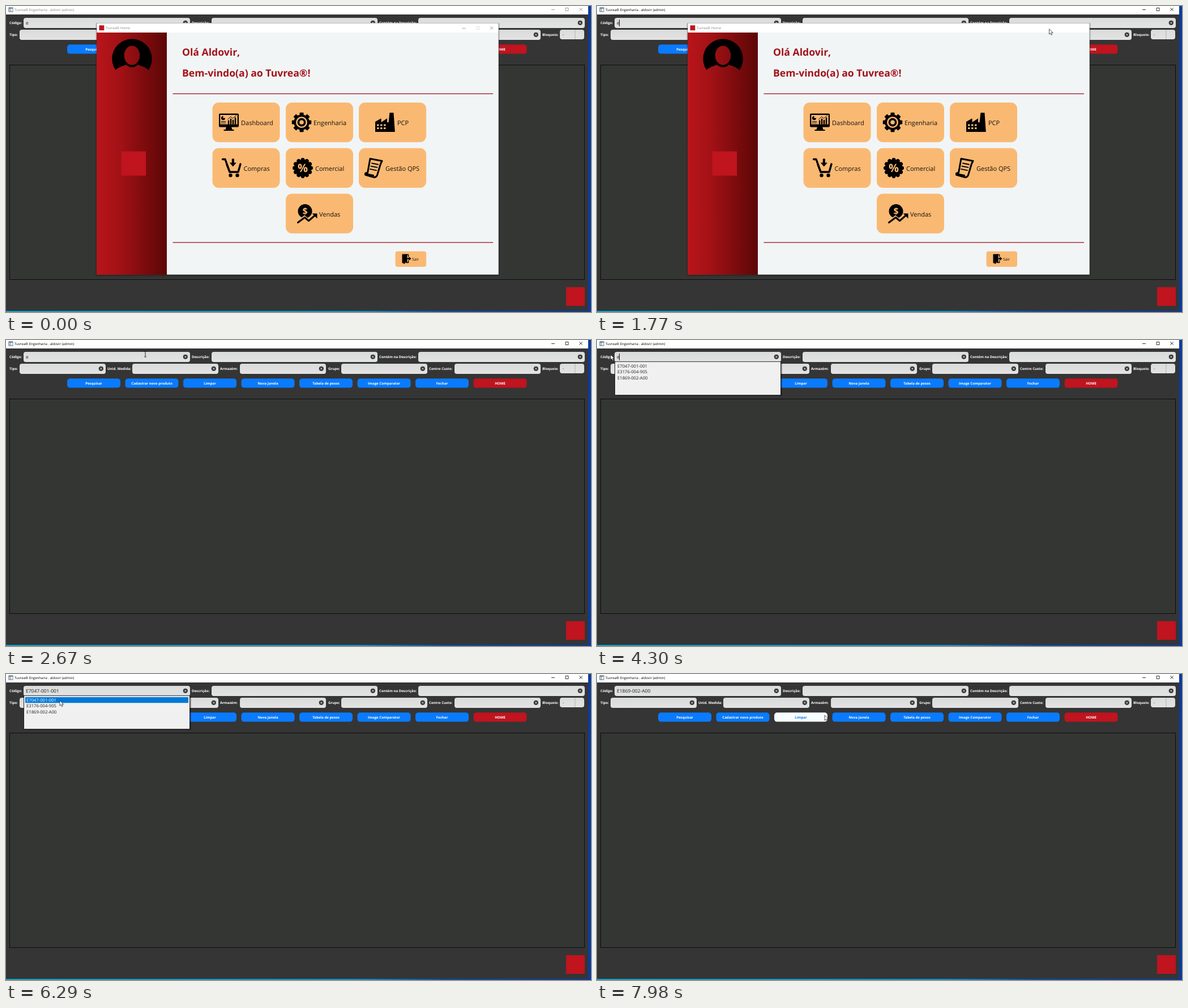
Animation of 1033 by 542 pixels, one loop 8000 ms. Source, as an HTML page:

```html
<!DOCTYPE html>
<html lang="pt">
<head>
<meta charset="utf-8">
<style>
html, body { margin: 0; width: 100%; height: 100%; overflow: hidden; background: #353535; }
svg { display: block; width: 1033px; height: 542px; font-family: "Open Sans", "Noto Sans", sans-serif; text-rendering: geometricPrecision; }
.b { font-weight: 700; }
.ink { fill: #000; }
.pen { fill: none; stroke: #000; stroke-linecap: round; stroke-linejoin: round; }
.bg { fill: var(--c); }
.cut { fill: none; stroke: var(--c); }
</style>
</head>
<body>
<svg id="stage" viewBox="0 0 1033 542"></svg>
<script>
const LOOP = 8000, RED = '#c0141f', BLUE = '#0a7bff', TILE = '#fab972';
const stage = document.getElementById('stage');
const $ = id => document.getElementById(id);

const rect = (x, y, w, h, fill, more = '') =>
  `<rect x="${x}" y="${y}" width="${w}" height="${h}" fill="${fill}" ${more}/>`;
const text = (x, y, size, fill, str, more = '') =>
  `<text x="${x}" y="${y}" font-size="${size}" fill="${fill}" ${more}>${str}</text>`;
const path = (d, cls = 'ink', more = '') => `<path d="${d}" class="${cls}" ${more}/>`;
const disc = (x, y, r, cls = 'ink', more = '') => `<circle cx="${x}" cy="${y}" r="${r}" class="${cls}" ${more}/>`;
const ring = (n, draw) => Array.from({ length: n }, (_, i) => draw(i * 360 / n)).join('');

// Main window
const fields = [
  [31, 325, 21], [363, 656, 21], [728, 1022, 21],
  [24, 176, 42], [223, 375, 42], [413, 565, 42], [592, 744, 42], [792, 944, 42]
];
const labels = [
  [6, 32, 'Código:'], [328, 32, 'Descrição:'], [659, 32, 'Contém na Descrição:'],
  [6, 53, 'Tipo:'], [179, 53, 'Unid. Medida:'], [378, 53, 'Armazém:'],
  [569, 53, 'Grupo:'], [747, 53, 'Centro Custo:'], [947, 53, 'Bloqueio:']
];
const buttons = ['Pesquisar', 'Cadastrar novo produto', 'Limpar', 'Nova Janela',
  'Tabela de pesos', 'Image Comparator', 'Fechar', 'HOME'].map((name, i) => ({ name, x: 108 + 102.5 * i }));

const field = ([x1, x2, y]) => {
  const cx = x2 - 8.2, cy = y + 8.8;
  return rect(x1, y, x2 - x1, 18, 'url(#field)', 'rx="4"') + disc(cx, cy, 4.1, '', 'fill="#353535"') +
    path(`M${cx - 1.5} ${cy - 1.5}l3 3m0-3l-3 3`, '', 'stroke="#e6e6e6" stroke-width="1"');
};

const windowButtons = (x, y, midOpacity) =>
  path(`M${x - 3} ${y + .5}h6`, 'wb') +
  path(`M${x + 22} ${y - 2.5}h5v5h-5z`, 'wb', `opacity="${midOpacity}"`) +
  path(`M${x + 46.4} ${y - 2.7}l5.4 5.4m0-5.4l-5.4 5.4`, 'wb');

const mainWindow = () =>
  rect(0, 0, 1033, 542, '#353535') +
  rect(0, 0, 1028, 15, '#fff') +
  rect(1028, 0, 5, 542, '#0b3b9c') +
  rect(0, 540, 1033, 2, 'url(#taskbar)') +
  rect(4.5, 2.5, 8, 8, '#5b6b7a') + rect(5.5, 4.5, 3, 5, '#bcdcf2') + rect(9, 4.5, 2.6, 5, '#fff') +
  `<g id="title">${text(15, 9.2, 6.1, 'currentColor', 'Tuvrea® Engenharia . aldovir (admin)')}
   <g fill="none" stroke="currentColor" stroke-width=".8">${windowButtons(966, 6, 1)}</g></g>` +
  labels.map(([x, y, s]) => text(x, y, 6.1, '#fff', s, 'class="b"')).join('') +
  fields.map(field).join('') +
  rect(978, 42, 43, 17, 'url(#field)', 'rx="4"') + rect(1004.5, 42, .8, 17, '#a8a8a8') +
  text(983, 53, 7, '#222', '-') +
  buttons.map((b, i) =>
    rect(b.x, 68.3, 94, 16.3, '', `rx="5" id="btn${i}"`) +
    text(b.x + 47, 79, 6.1, '#fff', b.name, `class="b" text-anchor="middle" id="cap${i}"`)).join('') +
  rect(6.5, 104.5, 1015, 380, '#343634', 'stroke="#0c0c0c"') +
  rect(989, 498, 33, 33, RED) +
  rect(35, 24.5, 5, 11.5, '#0078d7', 'id="selection"') +
  text(35, 33.2, 8.5, '#222', '', 'id="code"') +
  rect(39, 24, 1, 12, '#111', 'id="caret"');

// Completion list
const codes = ['E7047-001-001', 'E3176-004-905', 'E1869-002-A00'];
const rowTop = i => 41 + 10.3 * i;
const popup = () =>
  `<g id="popup">` + rect(33.5, 40, 293.5, 59, '#000', 'opacity=".35"') +
  rect(31.5, 38.3, 293, 59.4, '#f0f0f0', 'stroke="#161616" stroke-width=".9"') +
  codes.map((c, i) =>
    rect(34, rowTop(i), 288, 10.2, '#0078d7', `id="row${i}"`) +
    text(36, rowTop(i) + 8, 7.66, '#222', c, `id="item${i}"`)).join('') + `</g>`;

// Home window icons
const icons = {
  dashboard: rect(376, 190.5, 35, 24, '#000', 'rx="2"') + rect(378.3, 193, 30.4, 16.5, '', 'class="bg"') +
    path('M389 214h9l1.5 5h3v2h-18v-2h3z') + disc(383.5, 198.5, 3.6) +
    path('M383.5 198.5v-4a4 4 0 0 1 4 4z', 'bg') +
    path('M380 204.5h8m-8 2.5h8', 'pen', 'stroke-width="1"') +
    path('M393 208.5v-5m4 5v-8m4 8v-6m4 6v-10', 'pen', 'stroke-width="2.5" stroke-linecap="butt"') +
    path('M391.5 201l5-5 4 3 6-5', 'pen', 'stroke-width="1"'),
  gear: disc(522, 206, 13.8) +
    ring(8, a => rect(518.5, 188.8, 7, 8, '#000', `rx="1" transform="rotate(${a} 522 206)"`)) +
    disc(522, 206, 8.7, 'cut', 'stroke-width="2.6"') + disc(522, 206, 3.8, 'bg'),
  factory: path('M652 223v-18l10.5-6v7l10.5-7v7h2.6l1.8-17h7l2.4 34z') +
    [0, 1].map(r => [0, 1, 2].map(c => rect(655 + c * 6, 209.5 + r * 5.5, 3.5, 3, '', 'class="bg"')).join('')).join(''),
  cart: path('M382.5 271.5h4.5l8 22.5h15l4-14', 'pen', 'stroke-width="3.4"') +
    path('M390 281l5 13', 'pen', 'stroke-width="3.4"') +
    disc(396.5, 300, 3.2) + disc(408.5, 300, 3.2) +
    path('M398.8 270.5h4v7h4l-6 7-6-7h4z'),
  percent: disc(524, 287, 15.2) +
    ring(12, a => disc(524, 272.4, 3.4, 'ink', `transform="rotate(${a} 524 287)"`)) +
    text(524, 294.2, 20, 'var(--c)', '%', 'class="b" text-anchor="middle"'),
  scroll: path('M643 270.5l21 4-2.5 5-6 20q-2 5-7 3.5l-14-4q-1-4 4-3.5z', 'pen', 'stroke-width="3"') +
    path('M633 295.5l17 3.5q0 4-3 4-14-2-14-7.5z') +
    path('M646 278.5l11 2.2m-12.5 3l11 2.2m-12.5 3l11 2.2', 'pen', 'stroke-width="1.9"'),
  sales: disc(528, 363.5, 12.5) +
    text(528, 369.3, 16, 'var(--c)', '$', 'class="b" text-anchor="middle"') +
    path('M515 384l12-9.5 7 6 12-10.5', 'cut', 'stroke-width="6"') +
    path('M515.5 383.5l12-9 7 6 12-10.5', 'pen', 'stroke-width="3"') +
    path('M540.5 367.5h9v9z'),
  exit: path('M699.5 439.5h9l0 1.5v13.5h-4v2.5l-5-2z') +
    path('M707 440.5h3.6v3.5m0 7v3.5h-3.6', 'pen', 'stroke-width="1.3"') +
    path('M708.5 446.3h3v-2.4l4 3.6-4 3.6v-2.4h-3z')
};
const tiles = [
  [364.5, 171, 'Dashboard', 415, 'dashboard'], [494, 171, 'Engenharia', 543, 'gear'], [623, 171, 'PCP', 691, 'factory'],
  [364.5, 251.7, 'Compras', 419.5, 'cart'], [494, 251.7, 'Comercial', 546, 'percent'], [623, 251.7, 'Gestão QPS', 670, 'scroll'],
  [494, 332.5, 'Vendas', 553, 'sales']
];

const homeWindow = () => `<g id="home">` +
  rect(158.5, 30, 713, 448.5, '#000', 'opacity=".22" rx="2"') +
  rect(160, 30, 710, 446, '#f1f5f6') + rect(160, 30, 710, 17, '#fff') +
  rect(160.2, 30.2, 709.6, 445.6, 'none', 'stroke="#777" stroke-width=".5"') +
  rect(164.5, 34.3, 8.8, 8.8, RED) + text(176, 41.4, 6.1, '#8a8a8a', 'Tuvrea® Home') +
  rect(796.5, 30.5, 24.3, 16, '#e5e5e5', 'id="minHover"') +
  `<g id="homeButtons" fill="none" stroke="#8c8c8c" stroke-width=".8">${windowButtons(808.5, 39, .3)}</g>` +
  rect(160, 47, 124, 429, 'url(#side)') +
  rect(186, 57, 74, 60, '#000', 'mask="url(#avatar)"') +
  rect(203.5, 257.5, 43.5, 43, RED) +
  text(311, 87.6, 17.6, '#a3121a', 'Olá Aldovir,', 'class="b"') +
  text(311, 125.2, 17.6, '#a3121a', 'Bem-vindo(a) ao Tuvrea®!', 'class="b"') +
  rect(294.5, 154.8, 565.5, 1.3, '#a3121f') + rect(294.5, 418.2, 565.5, 1.3, '#a3121f') +
  tiles.map(([x, y, name, tx, icon], i) => `<g id="tile${i}">` +
    rect(x, y, 119, 70.2, '', 'rx="11" class="bg"') + icons[icon] +
    text(tx, y + 40, 11, '#111', name) + `</g>`).join('') +
  `<g style="--c:${TILE}">` + rect(687.5, 434.5, 54.5, 27.5, TILE, 'rx="4"') + icons.exit +
  text(717, 450.8, 6.9, '#111', 'Sair') + `</g></g>`;

const cursors =
  path('M0 0v9.2l2.1-2 1.5 3.4 1.6-.7-1.5-3.3h3z', '', 'id="arrow" fill="#fff" stroke="#111" stroke-width=".7"') +
  path('M-2-5h1.3l.7.6.7-.6h1.3M0-4.4v8.8M-2 5h1.3l.7-.6.7.6h1.3', '', 'id="beam" fill="none" stroke="#111" stroke-width=".9"');

stage.innerHTML = `<defs>
  <linearGradient id="field" x2="0" y2="1"><stop stop-color="#dadbdb"/><stop offset="1" stop-color="#e3e3e3"/></linearGradient>
  <linearGradient id="side"><stop stop-color="#b8151a"/><stop offset=".3" stop-color="#a51216"/><stop offset="1" stop-color="#5c0606"/></linearGradient>
  <linearGradient id="taskbar"><stop stop-color="#12a0c4"/><stop offset=".6" stop-color="#1190cc"/><stop offset=".75" stop-color="#0a50a8"/><stop offset="1" stop-color="#0b3b9c"/></linearGradient>
  <mask id="avatar">${disc(222.5, 93.5, 35.3, '', 'fill="#fff"')}
    <ellipse cx="222.5" cy="87.5" rx="13.8" ry="17"/>
    <path d="M191 117.5C195 109 203 107.5 212 104Q222.5 113 233 104C242 107.5 250 109 254 117.5z"/></mask>
  </defs>` + mainWindow() + popup() + homeWindow() + cursors;

// Motion
const pointer = [
  [390, 585, 506], [530, 562, 420], [600, 556, 370], [740, 574, 300], [880, 645, 235], [1010, 745, 150],
  [1150, 808, 82], [1290, 809, 58], [1490, 804, 41], [1760, 804, 40], [1840, 760, 46], [1908, 682, 53],
  [2045, 527, 102], [2185, 527, 102], [2460, 415, 68], [2667, 246, 25], [2800, 195, 19], [3010, 171, 27],
  [3300, 60, 30], [3440, 34, 28], [3740, 24, 26], [4595, 24, 26], [4940, 72, 54], [5150, 72, 55],
  [5460, 80, 67], [5700, 88, 57], [5930, 93, 46], [6250, 95, 47], [6320, 95, 48], [6500, 94, 57],
  [6690, 94, 66], [7350, 94, 66], [7565, 320, 118], [7705, 572, 189], [7842, 490, 130], [7980, 402, 73]
];
const shrink = [[1700, 1, 1], [1770, 1, 1], [1838, .87, .72], [1908, .64, .24], [1978, .55, .04], [2045, .52, 0]];
const caretOn = [[1700, 2250], [2780, 3300], [3440, 3970], [4300, 4830], [6500, 7030], [7430, 7960]];

function track(keys, t) {
  const i = keys.findIndex(k => k[0] > t);
  if (i === 0) return keys[0].slice(1);
  if (i < 0) return keys[keys.length - 1].slice(1);
  const a = keys[i - 1], b = keys[i], u = (t - a[0]) / (b[0] - a[0]);
  return a.slice(1).map((v, j) => v + (b[j + 1] - v) * u);
}
const show = (id, on) => $(id).setAttribute('display', on ? 'inline' : 'none');
const fill = (id, color) => $(id).setAttribute('fill', color);
const inside = (x, y, x1, y1, w, h) => x >= x1 && x <= x1 + w && y >= y1 && y <= y1 + h;

function render(t) {
  const tick = 390 + 69 * Math.floor((t - 380) / 69);
  const [x, y] = track(pointer, tick);
  const homeOpen = t < 1700, popupOpen = t >= 4300 && t < 7430;

  $('title').style.color = homeOpen ? '#858585' : '#000';
  show('homeButtons', homeOpen);
  show('minHover', homeOpen && inside(x, y, 796, 30, 25, 17));
  const [scale, opacity] = track(shrink, tick);
  const slide = (1 - scale) / .36;
  $('home').setAttribute('transform',
    `translate(${160 + 210 * slide} ${30 + 225 * slide}) scale(${scale}) translate(-160 -30)`);
  $('home').setAttribute('opacity', opacity);
  show('home', opacity > 0);
  tiles.forEach(([tx, ty], i) => {
    const hot = homeOpen && t >= 390 && inside(x, y, tx, ty, 119, 70);
    $('tile' + i).style.setProperty('--c', hot ? '#fcd5a5' : TILE);
  });

  buttons.forEach((b, i) => {
    const hot = !homeOpen && !popupOpen && inside(x, y, b.x, 68, 94, 17);
    const base = b.name === 'HOME' ? RED : BLUE;
    fill('btn' + i, hot ? '#f7feff' : base);
    fill('cap' + i, hot ? base : '#fff');
  });

  const row = t < 5180 ? -1 : Math.max(0, Math.min(2, Math.floor((y - 41) / 10.3)));
  codes.forEach((_, i) => {
    show('row' + i, i === row);
    fill('item' + i, i === row ? '#fff' : '#222');
  });
  show('popup', popupOpen);

  const value = t >= 7430 ? codes[2] : row >= 0 ? codes[row] : t >= 3440 && t < 4300 ? '' : 'e';
  const selected = t >= 3300 && t < 3440;
  $('code').textContent = value;
  fill('code', selected ? '#fff' : '#222');
  show('selection', selected);
  show('caret', caretOn.some(([a, b]) => t >= a && t < b));
  $('caret').setAttribute('x', value.length > 1 ? 94 : value ? 39 : 35);

  const overField = !homeOpen && !popupOpen && t >= 1840 &&
    fields.some(([x1, x2, fy]) => inside(x, y, x1, fy, x2 - x1, 18));
  show('arrow', t >= 390 && !overField);
  show('beam', overField);
  for (const id of ['arrow', 'beam']) $(id).setAttribute('transform', `translate(${x} ${y})`);
}

const start = performance.now();
function loop() {
  render((performance.now() - start) % LOOP);
  requestAnimationFrame(loop);
}
loop();
</script>
</body>
</html>
```
